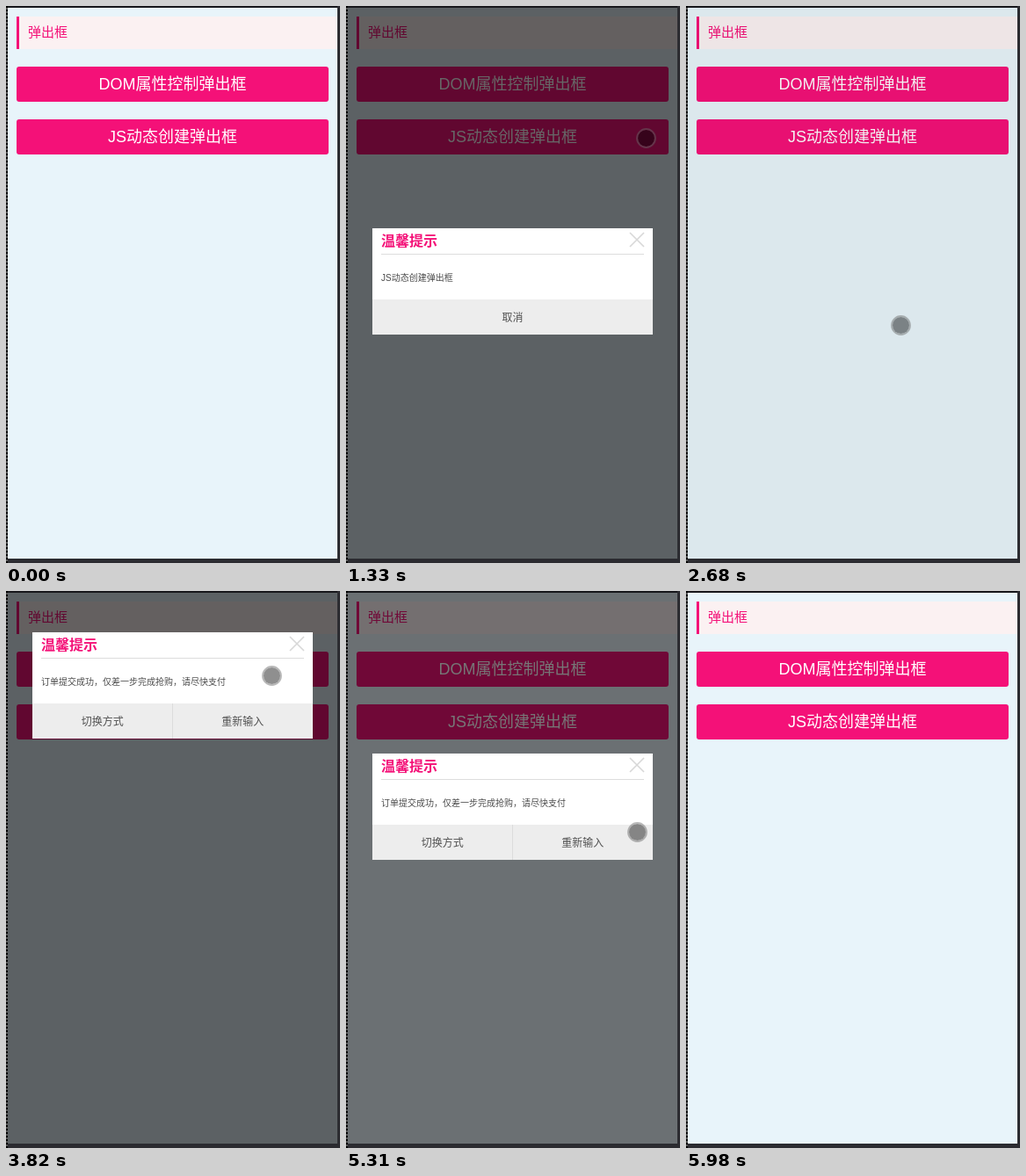
An HTML page with a canvas for the animation above (6660 ms loop, 380 px wide and 634 px high).

```html
<!DOCTYPE html>
<html lang="zh">
<head>
<meta charset="utf-8">
<title>弹出框</title>
<style>
html, body { margin: 0; width: 100%; height: 100%; overflow: hidden; background: #e8f4fa; }
canvas { display: block; }
</style>
</head>
<body>
<canvas id="stage" width="380" height="634"></canvas>
<script>
const ctx = document.getElementById('stage').getContext('2d');
const LOOP = 6660;
const PINK = '#f41178';
const FONT = '"Liberation Sans", "Noto Sans CJK SC", "Noto Sans CJK", sans-serif';

// The picture moves in steps: each beat appears slightly before its nominal time.
const FIRST = 540, STEP = 136, LEAD = 36;
const TOUCH_END = 5980;

const MODAL_H = 121, REST = 255;
const DIALOGS = [
  { open: 1107, close: 2302, message: 'JS动态创建弹出框', actions: ['取消'] },
  { open: 3750, close: 5218, message: '订单提交成功，仅差一步完成抢购，请尽快支付',
    actions: ['切换方式', '重新输入'] }
];

// Finger strokes, each easing to a new point and resting there
const ENTRY = { x: 366, y: 165 };
const STROKES = [
  { from: 540, to: 660, x: 341.5, y: 150.5 },
  { from: 1500, to: 1850, x: 244.5, y: 363.5 },
  { from: 2850, to: 3400, x: 302.5, y: 96.5 },
  { from: 4100, to: 4600, x: 331.5, y: 274.5 }
];

const ramp = (t, start, length) => Math.min(1, Math.max(0, (t - start) / length));
const smooth = p => p * p * (3 - 2 * p);
const easeOut = p => 1 - (1 - p) ** 3;
const easeIn = p => p ** 3;

function beat(clock) {
  const n = Math.floor((clock - FIRST + LEAD) / STEP);
  return n < 0 ? 0 : FIRST + n * STEP;
}

function shadeAt(t, { open, close }) {
  return 0.6 * (ramp(t, open - 200, 150) - ramp(t, close + 40, 408));
}

function modalY(t, { open, close }) {
  const entered = (REST + MODAL_H) * easeOut(ramp(t, open, 302));
  return Math.round(entered - MODAL_H - 600 * easeIn(ramp(t, close, 168)));
}

function touchAt(t) {
  let { x, y } = ENTRY;
  for (const s of STROKES) {
    const p = smooth(ramp(t, s.from, s.to - s.from));
    x += (s.x - x) * p;
    y += (s.y - y) * p;
  }
  return [x, y];
}

function rect(x, y, w, h, color) {
  ctx.fillStyle = color;
  ctx.fillRect(x, y, w, h);
}

function text(str, x, cy, size, color, align = 'left', weight = 400) {
  ctx.font = `${weight} ${size}px ${FONT}`;
  ctx.textAlign = align;
  ctx.fillStyle = color;
  ctx.fillText(str, x, Math.round(cy + size * 0.35));
}

function button(label, y) {
  ctx.fillStyle = PINK;
  ctx.beginPath();
  ctx.roundRect(12, y, 355, 40, 3);
  ctx.fill();
  text(label, 189.5, y + 20, 18, '#fff', 'center');
}

function page() {
  rect(0, 0, 380, 634, '#e8f4fa');
  rect(12, 12, 365, 37, '#fbf1f2');
  rect(12, 12, 3, 37, PINK);
  text('弹出框', 25, 30, 15, PINK);
  button('DOM属性控制弹出框', 69);
  button('JS动态创建弹出框', 129);
}

function cross(cx, cy, r) {
  ctx.strokeStyle = '#d8d8d8';
  ctx.lineWidth = 1.7;
  ctx.beginPath();
  for (const dir of [-1, 1]) {
    ctx.moveTo(cx - r, cy - r * dir);
    ctx.lineTo(cx + r, cy + r * dir);
  }
  ctx.stroke();
}

function modal(y, { message, actions }) {
  rect(30, y, 319, MODAL_H, '#fff');
  text('温馨提示', 40, y + 14.5, 16, PINK, 'left', 700);
  rect(40, y + 29, 299, 1, '#ddd');
  cross(331, y + 13, 8);
  text(message, 40, y + 56, 10, '#4a4a4a');

  rect(30, y + 81, 319, 40, '#ededed');
  const w = 319 / actions.length;
  actions.forEach((label, i) => {
    if (i) rect(189, y + 81, 1, 40, '#dcdcdc');
    text(label, 30 + w * (i + 0.5), y + 102, 12, '#505050', 'center');
  });
}

function touch(x, y) {
  ctx.beginPath();
  ctx.arc(x, y, 9.5, 0, Math.PI * 2);
  ctx.fillStyle = 'rgba(0,0,0,.44)';
  ctx.fill();
  ctx.beginPath();
  ctx.arc(x, y, 10.4, 0, Math.PI * 2);
  ctx.strokeStyle = 'rgba(105,105,105,.47)';
  ctx.lineWidth = 2;
  ctx.stroke();
}

function bezel() {
  rect(0, 0, 380, 2, '#17171b');
  rect(377, 0, 3, 634, '#2b2b30');
  rect(0, 629, 380, 5, '#2b2b30');
  rect(0, 0, 2, 634, '#000');
  for (let y = 2; y < 634; y += 4) rect(0, y, 2, 2, '#555');
}

function draw(now) {
  const t = beat(now % LOOP);
  page();
  for (const dialog of DIALOGS) {
    rect(0, 0, 380, 634, `rgba(0,0,0,${shadeAt(t, dialog)})`);
    const y = modalY(t, dialog);
    if (y > -MODAL_H) modal(y, dialog);
  }
  if (t >= FIRST && t < TOUCH_END) touch(...touchAt(t));
  bezel();
}

const start = performance.now();
function tick() {
  draw(performance.now() - start);
  requestAnimationFrame(tick);
}
tick();
</script>
</body>
</html>
```
